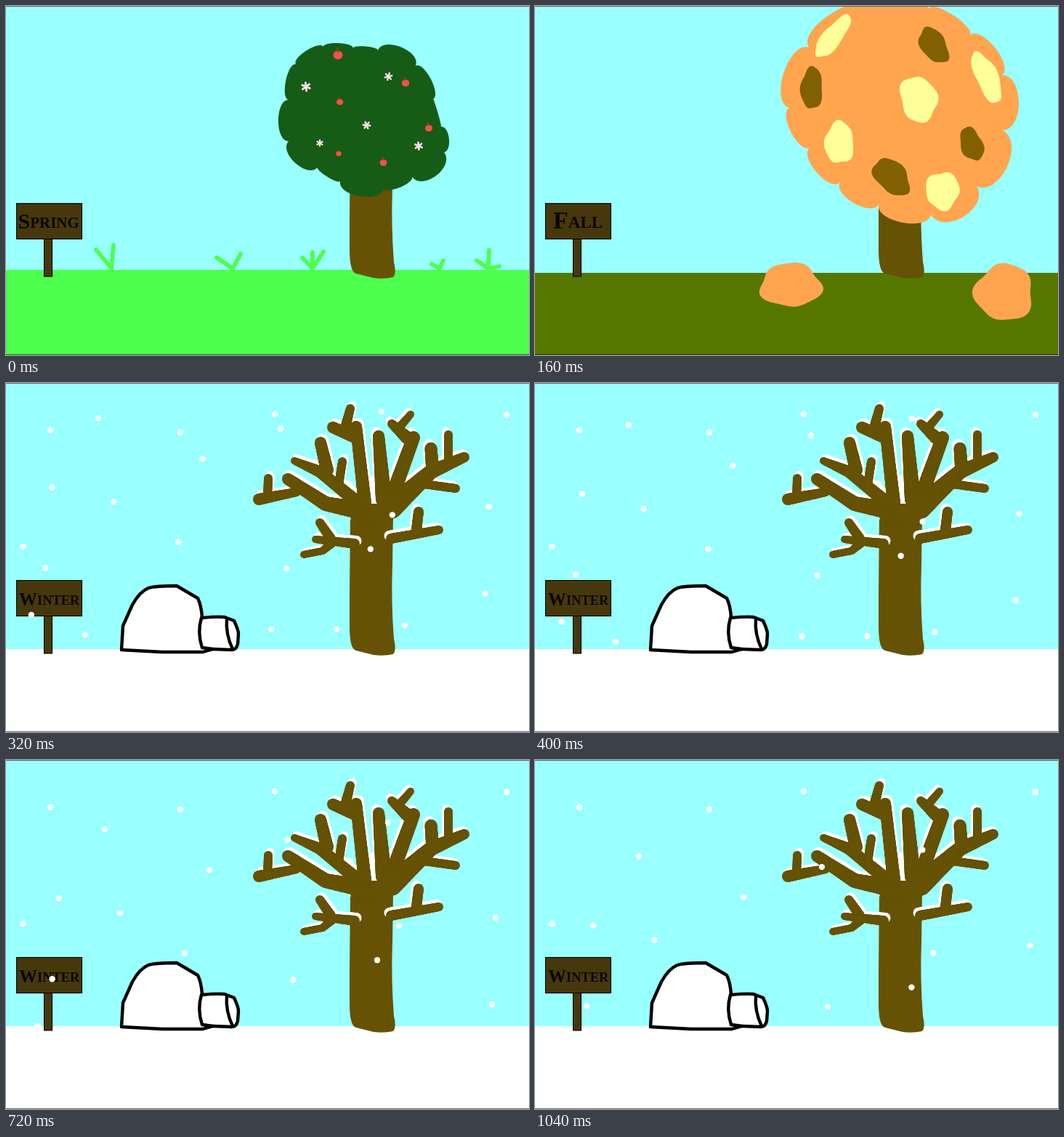
Recreate the animation shown at these times as an HTML page with a canvas. Size 720 by 480 pixels, loop 1120 ms.

```html
<!DOCTYPE html>
<html lang="en">
<head>
<meta charset="utf-8">
<title>Seasons</title>
<style>
html, body { margin: 0; width: 100%; height: 100%; overflow: hidden; }
canvas { display: block; width: 720px; height: 480px; }
</style>
</head>
<body>
<canvas id="stage" width="720" height="480"></canvas>
<script>
const ctx = document.getElementById('stage').getContext('2d');
const STEP = 80, LOOP = 1120;
const BARK = '#665204', PEACH = '#ffa54f', STRAW = '#ffff99', UMBER = '#806000';

function dot(x, y, rx, color, ry = rx) {
  ctx.fillStyle = color;
  ctx.beginPath();
  ctx.ellipse(x, y, rx, ry, 0, 0, 7);
  ctx.fill();
}

function line(color, width, x1, y1, x2, y2) {
  ctx.strokeStyle = color;
  ctx.lineWidth = width;
  ctx.lineCap = 'round';
  ctx.beginPath();
  ctx.moveTo(x1, y1);
  ctx.lineTo(x2, y2);
  ctx.stroke();
}

// Tapered round-ended limb.
function limb(color, x1, y1, r1, x2, y2, r2) {
  const n = Math.ceil(Math.hypot(x2 - x1, y2 - y1));
  for (let i = 0; i <= n; i++) {
    const t = i / n, mix = (a, b) => a + (b - a) * t;
    dot(mix(x1, x2), mix(y1, y2), mix(r1, r2), color);
  }
}

// Clockwise crown: each notch is [x, y, height of the lobe that follows].
function crown(notches, color) {
  ctx.beginPath();
  ctx.moveTo(notches[0][0], notches[0][1]);
  notches.forEach(([x, y, h], i) => {
    const [u, v] = notches[(i + 1) % notches.length];
    const k = h * 4 / 3 / Math.hypot(u - x, v - y);
    const nx = (v - y) * k, ny = (x - u) * k;
    ctx.bezierCurveTo(x + nx, y + ny, u + nx, v + ny, u, v);
  });
  ctx.fillStyle = color;
  ctx.fill();
}

// Wobbly tilted ellipse.
function patch(color, x, y, rx, ry, tilt) {
  const c = Math.cos(tilt), s = Math.sin(tilt);
  ctx.beginPath();
  for (let a = 0; a < 6.28; a += 0.1) {
    const r = 1 + 0.06 * Math.sin(3 * a + x) + 0.05 * Math.sin(5 * a + y);
    const px = rx * r * Math.cos(a), py = ry * r * Math.sin(a);
    ctx.lineTo(x + px * c - py * s, y + px * s + py * c);
  }
  ctx.fillStyle = color;
  ctx.fill();
}

function backdrop(ground, y) {
  ctx.fillStyle = '#99ffff';
  ctx.fillRect(0, 0, 720, 480);
  ctx.fillStyle = ground;
  ctx.fillRect(0, y, 720, 480 - y);
  ctx.fillStyle = BARK;
  ctx.fill(new Path2D('M474 180L473 290V335Q473 366 482 368Q494 371 506 374' +
    'Q520 376 533 373Q538 368 534 352Q530 300 532 250L533 180Z'));
}

function sign(word, big, small, x) {
  ctx.fillStyle = '#47370c';
  ctx.strokeStyle = '#000';
  ctx.lineWidth = 1;
  ctx.lineJoin = 'miter';
  for (const box of [[52.5, 320.5, 11, 51.5], [14.5, 271.5, 90, 49]]) {
    ctx.fillRect(...box);
    ctx.strokeRect(...box);
  }
  const font = size => ctx.font = `bold ${size}px "Liberation Serif", serif`;
  ctx.fillStyle = '#090702';
  font(big);
  ctx.fillText(word[0], x, 306);
  const w = ctx.measureText(word[0]).width;
  font(small);
  ctx.fillText(word.slice(1).toUpperCase(), x + w, 305);
}

function apple(x, y, r) {
  dot(x, y + 0.5, r, '#ff4d4d', r * 0.93);
  line('#804d10', r * 0.4, x - 1, y - r * 1.4, x, y - r * 0.7);
}

function flower(x, y, r) {
  for (let k = 0; k < 6; k++) {
    const a = k * Math.PI / 3 + x;
    line('#ffd9e8', r * 0.42, x, y, x + Math.cos(a) * r * 0.8, y + Math.sin(a) * r * 0.8);
  }
}

function spring() {
  const lime = '#4dff4d';
  backdrop(lime, 363);
  const blades = {
    145: [[124, 335], [148, 329]],
    312: [[290, 346], [323, 341]],
    422: [[408, 346], [422, 339], [437, 338]],
    597: [[586, 355], [602, 350]],
    664: [[648, 350], [665, 336], [679, 358]]
  };
  for (const x in blades) {
    for (const tip of blades[x]) line(lime, 5.8, ...tip, +x, 361);
  }
  crown([[399, 80, 8], [437, 56, 6], [478, 58, 4], [512, 61, 16], [564, 82, 10],
    [588, 128, 1], [599, 166, 9], [603, 201, 19], [559, 235, 7], [520, 251, 16],
    [460, 241, 4], [429, 222, 16], [389, 186, 14], [389, 129, 9]], '#165c16');
  [[457, 67, 6.5], [550, 105.5, 5.2], [459.5, 131.5, 4.6], [582, 167.5, 5],
    [458, 202.5, 3.8], [519.5, 215, 4.8]].forEach(a => apple(...a));
  [[413, 111, 7], [526.5, 97, 6], [496.5, 164, 6], [432, 188.5, 5.2],
    [568, 192.5, 6.3]].forEach(f => flower(...f));
  sign('Spring', 30, 21, 16.5);
}

function tuft(x, y, s) {
  line('#075407', s * 0.7, x, y, x - s * 0.75, y - s * 0.5);
  line('#075407', s * 0.7, x, y, x + s * 0.85, y - s * 0.9);
}

function summer() {
  backdrop('#008000', 367);
  crown([[389, 74, 29], [474, 29, 15], [539, 27, 13], [583, 57, 27], [622, 114, 15],
    [618, 167, 18], [590, 217, 31], [535, 261, 10], [481, 258, 18], [431, 225, 15],
    [391, 183, 18], [365, 122, 11]], '#075407');
  [[178, 372, 9], [47, 427, 14], [341, 413, 10], [554, 443, 13], [634, 366, 6.5]]
    .forEach(t => tuft(...t));
  sign('Summer', 25, 17.6, 18);
}

function fall() {
  backdrop('#557700', 367);
  crown([[377, 57, 25], [474, 1, 4], [543, 3, 10], [599, 40, 16], [643, 95, 23],
    [643, 171, 27], [608, 248, 26], [545, 287, 18], [473, 273, 15], [420, 243, 15],
    [378, 195, 13], [350, 140, 22]], PEACH);
  patch(STRAW, 410, 42, 36, 13, -0.9);
  patch(STRAW, 622, 98, 38, 15, 1.15);
  patch(STRAW, 528, 128, 32, 25, 1.3);
  patch(STRAW, 419, 188, 29, 20, 1.57);
  patch(STRAW, 561, 254, 26, 23, 1.57);
  patch(UMBER, 549, 54, 27, 17, 1);
  patch(UMBER, 381, 113, 29, 15, 1.6);
  patch(UMBER, 491, 235, 30, 20, 0.8);
  patch(UMBER, 601, 190, 24, 15, 1.2);
  patch(PEACH, 352, 384, 42, 30, 0);
  patch(PEACH, 646, 394, 40, 39, 0);
  sign('Fall', 34, 23, 25);
}

const leftLimbs = [
  [348, 160, 8, 400, 150, 6], [361, 131, 6, 360, 158, 6],
  [388, 132, 8, 440, 166, 10], [440, 166, 10, 490, 176, 12],
  [397, 107, 5, 432, 122, 8], [432, 122, 8, 485, 165, 9],
  [433, 82, 8, 442, 120, 9], [463, 108, 6, 458, 140, 6],
  [482, 60, 8, 494, 165, 9], [450, 61, 8, 478, 74, 8], [474, 35, 6, 467, 62, 7],
  [432, 192, 6, 447, 214, 7], [426, 215, 5, 480, 221, 7],
  [410, 236, 5, 436, 231, 5], [436, 231, 5, 450, 218, 7]
];
const rightLimbs = [
  [513, 73, 8, 520, 160, 11], [561, 75, 9, 530, 160, 10],
  [531, 56, 6, 553, 76, 9], [557, 43, 5, 540, 63, 6],
  [631, 102, 7, 585, 122, 10], [585, 122, 10, 530, 172, 15],
  [585, 90, 8.5, 587, 115, 9], [609, 71, 6, 609, 104, 6], [575, 139, 6, 619, 145, 6],
  [530, 214, 7, 596, 202, 6], [568, 177, 7, 565, 203, 7], [490, 182, 16, 518, 182, 16]
];

// Snow is the same limb, lifted and leaned towards the trunk.
function bareTree() {
  const snow = (limbs, lean) => limbs.forEach(([x1, y1, r1, x2, y2, r2]) =>
    limb('#fff', x1 + lean, y1 - 4, r1, x2 + lean, y2 - 4, r2));
  snow(leftLimbs, 2.5);
  snow(rightLimbs, -2.5);
  limb('#fff', 471, 141, 7, 481, 157, 2);
  limb('#fff', 506, 133, 6, 507, 162, 2);
  for (const p of [...leftLimbs, ...rightLimbs]) limb(BARK, ...p);
}

function igloo() {
  ctx.fillStyle = '#fff';
  ctx.strokeStyle = '#000';
  ctx.lineWidth = 4.4;
  ctx.lineJoin = ctx.lineCap = 'round';
  const shell = new Path2D('M159 367L161 334L174 305Q184 287 196 282Q205 279 235 279' +
    'L264 296Q269 306 270 323Q290 321 301 322L314 327Q320 340 320 345L319 359' +
    'Q317 367 311 367L285 366L271 370H215Z');
  ctx.fill(shell);
  ctx.stroke(shell);
  ctx.stroke(new Path2D('M269 323Q263 343 270 364L285 366M304 324Q302 345 312 366'));
  line('#e0ffff', 1, 243, 304, 247, 311);
}

const still = [[61, 65], [240, 68], [370, 43], [689, 44], [23.5, 225]];
const drifting = [[125, 39], [376.5, 53.5], [515, 30], [268.5, 95], [61.5, 134], [146, 154],
  [235, 209.5], [52.5, 245], [33, 309.5], [107, 337], [363.5, 329.5], [453.5, 329.5],
  [547, 324], [384.5, 246], [500, 219], [530, 172], [663, 161], [658, 280]];

function winter(step) {
  backdrop('#fff', 366);
  bareTree();
  igloo();
  sign('Winter', 25, 18.4, 18);
  for (const [x, y] of still) dot(x, y, 4.2, '#fff');
  for (const [x, y] of drifting) dot(x + step * 1.84, y + step * 9.36, 4.2, '#fff');
}

function draw(step) {
  if (step < 3) [spring, summer, fall][step]();
  else winter(step - 3);
  ctx.fillStyle = '#666';
  ctx.fillRect(0, 0, 720, 1);
  ctx.fillStyle = 'rgba(0,0,0,.6)';
  ctx.fillRect(0, 479, 720, 1);
}

const start = performance.now();
let shown = -1;
function tick() {
  const step = Math.floor(((performance.now() - start) % LOOP) / STEP);
  if (step !== shown) draw(shown = step);
  requestAnimationFrame(tick);
}
tick();
</script>
</body>
</html>
```
